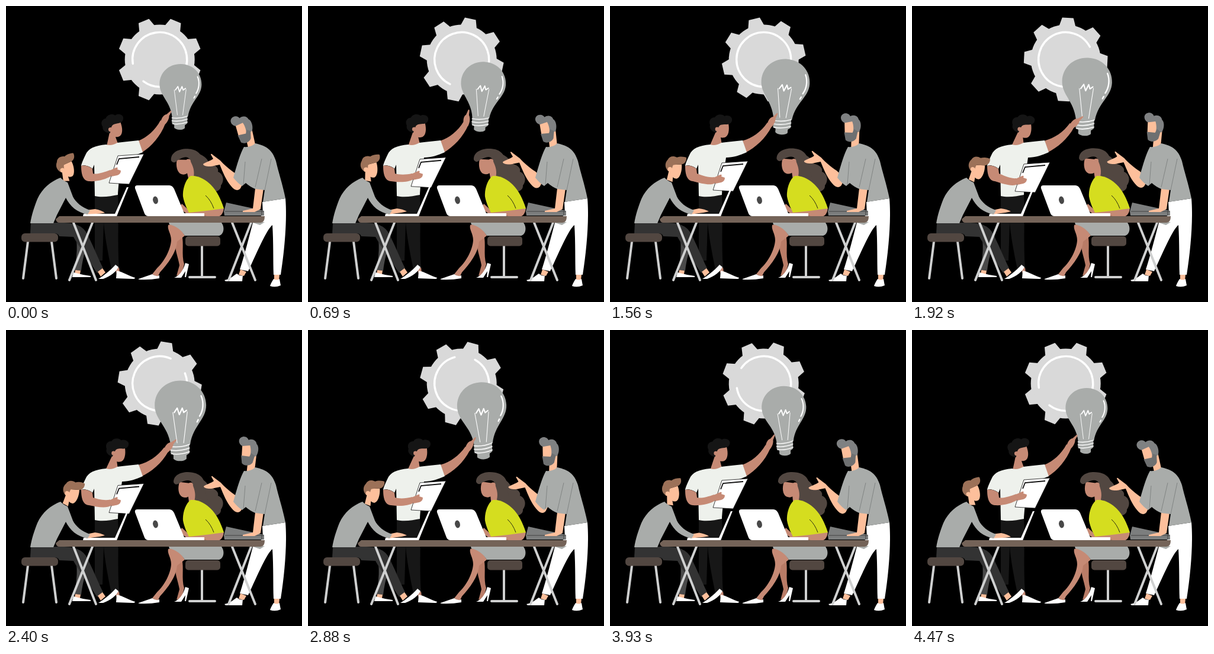
Write an HTML page that moves like this. It is 500x500 px and loops after 4530 ms.

```html
<!DOCTYPE html>
<html lang="en">
<head>
<meta charset="utf-8">
<title>Team idea</title>
<style>
  html, body { margin: 0; width: 100%; height: 100%; overflow: hidden; background: #000; }
  svg { display: block; width: 100%; height: 100%; }
  .white { fill: #fff; }
  .gray { fill: #a9acaa; }
  .light { fill: #fdbf9b; }
  .dark { fill: #c68a75; }
  .brown { fill: #524741; }
  .line { fill: none; stroke: #fff; stroke-linecap: round; stroke-linejoin: round; }
  .leg { fill: none; stroke: #cfd0d0; stroke-width: 4; stroke-linecap: round; }
  .fold { fill: none; stroke: #777a79; stroke-width: .8; }
</style>
</head>
<body>
<svg viewBox="0 0 500 500">
  <g id="gear" fill="#d9d9d9">
    <circle r="59"/>
    <g id="teeth"></g>
    <circle class="line" r="46" stroke-width="3.4" pathLength="360" stroke-dasharray="316 44" transform="rotate(171)"/>
  </g>

  <g id="bulb">
    <path class="gray" d="M294.5 98C315 98 330 113 330 132C330 152 312 160 308 186H281C277 160 259 152 259 132C259 113 274 98 294.5 98Z"/>
    <path class="gray" d="M281 184H307V198L303 201V206Q300 209 294 209T285 206V201L281 198Z"/>
    <path class="line" stroke-width="1.3" d="M281 189Q294 191 307 186M281 194Q294 196 307 191M282 199Q294 201 307 196"/>
    <path class="line" stroke-width=".9" d="M284 142L290 184M304 141L299 184"/>
    <path class="line" stroke-width="1.8" d="M286 142L290 136L293 145L297 136L299 142L303 139"/>
    <path class="line" stroke-width="2" d="M323 119C327 128 326 139 321 147M319 152L317.500 155"/>
  </g>

  <!-- presenter -->
  <path fill="#171717" d="M150 320L189 318C191 350 188 400 191 442L178 445C172 415 167 390 165 366L163 430L150 430Z"/>
  <path class="dark" d="M184 443L191 442L192 450L187 452Z"/>
  <path class="white" d="M187 447C197 449 208 456 218 459Q218 461 214 461L186 460Z"/>
  <g id="presenterHead">
    <path class="dark" d="M182 200L200 199C202 210 200 220 194 222C190 223 187 222 187 222L189 234C183 238 175 238 169 235L178 214Z"/>
    <path fill="#151515" d="M179 214C172 212 167 207 169 201C166 194 170 188 177 188C180 182 190 182 193 186C199 183 207 187 206 193C205 199 200 200 196 200C190 200 184 200 183 206Z"/>
    <circle class="dark" cx="181" cy="208" r="3.500"/>
  </g>
  <g id="pointArm" class="dark">
    <path d="M223 228C238 222 252 210 261 193L269 199C261 220 246 237 229 248Z"/>
    <path id="pointHand" d="M-4 2C-7 -7 -5 -13 -2 -15L1 -24Q3 -25 3 -22L3 -15C6 -10 6 -2 3 4Z"/>
  </g>
  <path fill="#eef1ec" d="M169 234C150 236 139 240 134 252C130 260 127 268 127 270C133 268 142 271 146 275L149 268L150 321C163 324 178 321 189 319C190 300 194 270 196 256C208 256 220 252 231 247L224 227C212 228 198 230 188 231Q178 237 169 234Z"/>
  <path id="foldedArm" class="dark"/>
  <g id="tablet">
    <path class="white" stroke="#111" stroke-width=".8" d="M189 253L233 250L208 301L174 299Z"/>
    <path fill="none" stroke="#111" stroke-width="1.800" d="M187 268L191 258L225 255"/>
    <path class="dark" d="M175 278L186 273Q190 272 188 276L194 278Q194 284 188 286L178 288Z"/>
  </g>

  <!-- seated man -->
  <path class="leg" d="M37 398L29 460M77 398L85 460"/>
  <rect class="brown" x="26" y="384" width="62" height="14.500" rx="6"/>
  <path fill="#4a4a4a" d="M118 372L140 390C133 415 129 430 127 447L115 446C120 425 122 400 116 378Z"/>
  <path class="light" d="M117 446L126 447L125 453L116 452Z"/>
  <path class="white" d="M114 450Q128 454 143 456V458H112Z"/>
  <path fill="#333" d="M42 366H98C120 367 131 373 137 385C146 402 155 425 164 443L154 451C140 430 122 405 114 390L90 389Q88 384 82 384H41Z"/>
  <path class="light" d="M155 449L163 443L168 450L160 457Z"/>
  <path class="white" d="M156 461C163 457 176 447 185 437L190 441C186 449 176 457 164 461Z"/>
  <g id="seatedHead">
    <path class="light" d="M104 268L119 266C121 277 118 290 112 291Q108 291 106 289L106 297L96 294L99 275Z"/>
    <path fill="#9c7158" d="M97 279C91 274 90 266 95 260C97 254 104 252 110 255C116 252 124 253 126 254C127 260 124 265 119 266L105 268C103 272 104 276 102 279Z"/>
    <circle class="light" cx="100" cy="276" r="3.800"/>
  </g>
  <path class="white" d="M131 351H184L204 306H207L187 355H130Z"/>
  <path id="typingHand" class="light" d="M136 345L150 342Q160 343 167 347L158 349L135 352Z"/>
  <path class="gray" d="M92 290C76 296 61 308 53 326C47 341 43 354 41 367H80L86 353L101 324C108 338 120 349 138 352L142 345C128 340 118 332 113 322L104 298Q98 296 92 290Z"/>

  <!-- woman -->
  <path class="leg" d="M331 405V458M310 458H353" stroke-width="3"/>
  <rect class="brown" x="303" y="389" width="59" height="16.500" rx="5"/>
  <path fill="#b97c67" d="M285 390C284 410 291 425 293 438L288 456L297 452L301 436C296 420 301 402 297 386Z"/>
  <path class="dark" d="M274 370C272 378 279 384 279 396C278 412 267 432 255 443L247 453L256 458L260 450C273 436 288 416 289 398L302 388L288 366Z"/>
  <path class="white" d="M224 461L247 453Q254 458 259 455L259 460Q242 463 224 462Z"/>
  <path class="white" d="M284 459C292 456 299 448 303 434L309 436L304 458H302L303 448L296 459Z"/>
  <path class="gray" d="M275 366H364C370 374 368 386 360 388H302C296 378 288 372 276 369Z"/>
  <path class="brown" d="M322 248C338 254 341 260 343 266C354 268 360 274 358 280C368 284 369 296 363 303C364 311 354 316 346 312L318 290Z"/>
  <g id="womanHead">
    <path class="dark" d="M291 258C288 268 290 280 297 283Q303 285 307 282L309 294L324 294L318 260Z"/>
    <path class="brown" d="M281 259C280 246 295 239 312 241C330 243 335 256 335 268C336 280 345 290 340 300L318 287C320 275 316 268 312 258C308 252 300 255 292 259C288 263 284 264 281 259Z"/>
    <circle class="dark" cx="310" cy="262" r="4"/>
  </g>
  <path class="dark" d="M368 341C367 352 362 356 355 356L308 353L292 341L297 334L310 346Z"/>
  <path fill="#d5dd1f" d="M312 287C303 293 298 310 299 322C301 333 306 343 309 349Q340 346 368 342C363 326 356 312 346 302C338 294 326 286 312 287Z"/>
  <path fill="none" stroke="#2b2d10" d="M337 320Q346 328 351 342"/>
  <path class="white" d="M222 303H276Q281 303 284 309L301 350H335V355H240Q235 355 233 348L218 308Q217 303 222 303Z"/>
  <ellipse fill="#484848" cx="252.500" cy="328" rx="4.300" ry="6.500" transform="rotate(-12 252.500 328)"/>

  <!-- bearded man -->
  <path class="white" d="M433 331L472 325C475 360 471 410 464 454H452C451 430 452 400 450 370C440 378 426 412 409 448L395 445C404 417 410 392 417 366L434 352Z"/>
  <path class="light" d="M396 445L406 449L402 456L393 454ZM453 454H462L461 463H453Z"/>
  <path class="white" d="M369 463C378 462 385 455 390 452Q395 457 400 455L399 465H371ZM446 473Q447 469 452 461Q457 464 462 461L464 472Q455 476 446 473Z"/>
  <path class="gray" d="M414 365H437L429 370Z"/>
  <g id="beardedHead">
    <path class="light" d="M397 196L411 194L422 208L420 240L407 240L408 222L397 216Z"/>
    <path fill="#7f8182" d="M397 197C389 193 389 183 397 181C402 180 406 183 407 186C413 183 420 186 421 192C426 196 425 208 421 213L411 213C413 205 411 198 410 195Z"/>
    <path fill="#6e7071" d="M396 213L410 214L413 208L419 212L416 224C412 230 402 231 398 226Z"/>
  </g>
  <path id="openArm" class="light" d="M388 283C380 278 368 268 362 261L350 252Q346 248 346 251L350 258C345 262 336 264 333 267C333 271 345 272 351 270L361 268C366 280 372 295 380 304C386 312 392 313 396 308L402 296Z"/>
  <path fill="#7c7e7e" d="M372 332L436 346V354H369L368 347Z"/>
  <path class="fold" style="stroke:#333" d="M370 347H435M432 346V354"/>
  <path class="light" d="M421 308H435L430 343L420 348H400V346L417 342Z"/>
  <path class="gray" d="M402 238C396 248 390 268 384 290Q392 300 399 304L405 299Q413 306 421 309L437 311L434 331L472 325C467 300 460 280 456 262C450 243 440 236 421 232Q414 239 402 238Z"/>
  <path class="fold" d="M404 263L401 302M432 258L421 306M448 258L437 311"/>

  <!-- table -->
  <path class="leg" d="M114 366L152 463M146 366L107 463M382 366L421 463M414 366L376 463"/>
  <path fill="#746358" d="M90 355H437Q437 366 430 366H90Q85 366 84 360Z"/>
</svg>
<script>
const LOOP = 4530, END = 4470, HALF = END / 2;
const $ = id => document.getElementById(id);
const place = (id, transform) => $(id).setAttribute('transform', transform);
const spin = (id, angle, x, y) => place(id, `rotate(${angle} ${x} ${y})`);

// Linear interpolation through [time, value] pairs
function track(t, ...keys) {
  const i = Math.max(1, keys.findIndex(k => k[0] >= t));
  const [t0, a] = keys[i - 1], [t1, b] = keys[i];
  return a + (b - a) * (t - t0) / (t1 - t0);
}
const swing = (t, rest, peak) => track(t, [0, rest], [HALF, peak], [END, rest]);

$('teeth').innerHTML = Array.from({ length: 8 }, (_, i) =>
  `<path d="M-14 -56L-9.500 -70.500H9.500L14 -56Z" transform="rotate(${22.5 + i * 45})"/>`).join('');

function draw(t) {
  place('gear', `translate(259.7 90.4) rotate(${-360 * t / END})`);
  const tilt = track(t, [0, 1], [HALF / 2, 6.5], [HALF * 1.5, -4.7], [END, 1]);
  const size = track(t, [0, 1], [2350, 1.23], [END, 1]);
  place('bulb', `translate(294 154) rotate(${tilt}) scale(${size}) translate(-294 -154)`);

  spin('presenterHead', track(t, [0, -11], [690, -4], [1920, 2], [3390, 1], [END, -11]), 182, 232);
  spin('pointArm', swing(t, 0, 9), 228, 238);
  const point = track(t, [0, 30], [690, 3], [1200, 8], [1920, 37], [2880, 23], [3390, 10], [END, 30]);
  place('pointHand', `translate(265.5 197) rotate(${point})`);

  const drop = track(t, [0, 0], [1200, 10], [1920, 14], [2880, 5], [3390, 2], [END, 0]);
  place('tablet', `translate(0 ${drop})`);
  $('foldedArm').setAttribute('d', `M127 270C127 285 130 295 140 296C155 ${297 + drop / 4} 170 ${292 + drop} 178 ${
    287 + drop}L176 ${277 + drop}C165 ${281 + drop * .8} 153 285 147 283L146 275Q136 268 127 270Z`);

  spin('seatedHead', swing(t, -17, 14), 102, 292);
  spin('typingHand', track(t, [0, 5], [690, 0], [3390, 0], [END, 5]), 138, 349);
  spin('womanHead', track(t, [0, -3], [2880, 4], [END, 4]), 318, 300);
  spin('beardedHead', swing(t, -16, 5), 413, 232);
  const armX = track(t, [0, 0], [1200, -7], [1920, -3.5], [2880, 5.5], [3390, 5], [END, 0]);
  const armY = track(t, [0, 0], [1200, -6], [1920, -4], [2880, -2], [END, 0]);
  place('openArm', `translate(${armX} ${armY})`);
}

function tick() {
  const t = performance.now() % LOOP;
  draw(Math.min(END, Math.floor(t / 30) * 30));
  requestAnimationFrame(tick);
}
tick();
</script>
</body>
</html>
```
